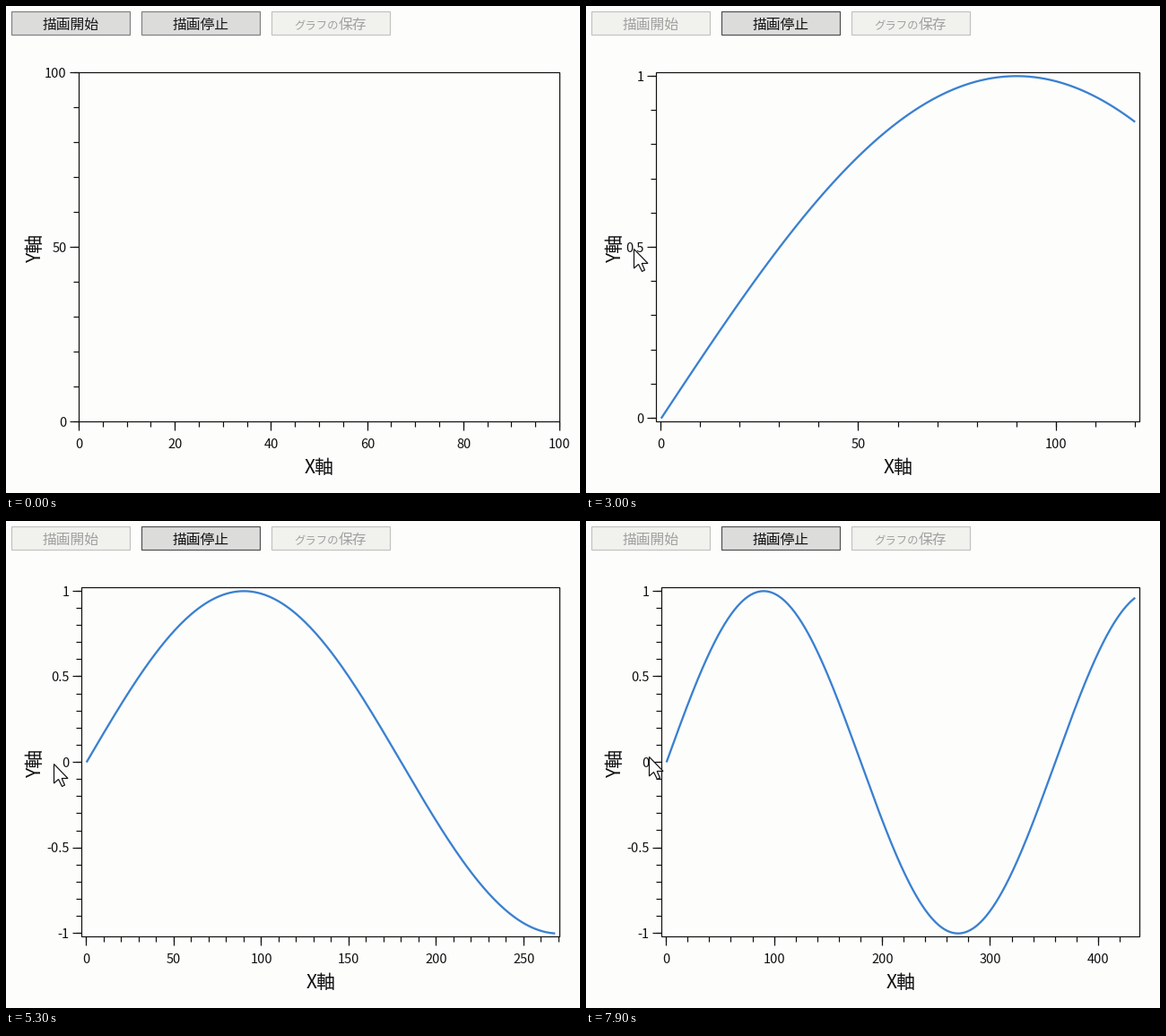
Animation of 640x544 px, one loop 8 s. Source, as a matplotlib script:

```python
import math

import numpy as np
import matplotlib.pyplot as plt
from matplotlib.animation import FuncAnimation
from matplotlib.patches import Polygon, Rectangle

W, H, DPI = 640, 544, 100
FRAMES, INTERVAL = 80, 100
START = 11                      # first step with a running plot
TOP, BOTTOM = 74.5, 464.5
FONT = "Noto Sans CJK JP"

BG = "#fdfdfc"
INK = "#101010"
CURVE = "#3a80d0"
# fill, border, text
IDLE = ("#dcdcdb", "#808080", "#181818")
FOCUS = ("#dcdcdb", "#505054", "#101010")
DISABLED = ("#f1f1ee", "#c2c2c2", "#a0a0a0")

CURSOR_T = [1, 8, 10, 11, 13, 18, 24, 30, 37, 65, 72, 79]
CURSOR_X = [618, 110, 76, 70, 45, 48, 51, 53, 53, 53, 58, 70]
CURSOR_Y = [500, 40, 18, 40, 215, 262, 286, 271, 271, 271, 270, 263]
ARROW = np.array([(0, 0), (0, 21.5), (5, 17), (9, 25), (12, 23.5),
                  (8.7, 16), (15.5, 16)])

fig = plt.figure(figsize=(W / DPI, H / DPI), dpi=DPI, facecolor=BG)
ax = fig.add_axes([0, 0, 1, 1])


def px(size):
    return size * 72 / DPI


def mid(v):
    """Centre of the pixel that holds v."""
    return math.floor(v) + 0.5


def text(x, y, s, size, color=INK, ha="center", rotation=0):
    ax.text(x, y, s, fontsize=px(size), color=color, family=FONT, ha=ha,
            va="baseline", rotation=rotation, rotation_mode="anchor")


def line(x, y, color=INK, width=1.2):
    ax.plot(x, y, color=color, lw=px(width), solid_capstyle="butt",
            snap=False)


def box(x0, y0, x1, y1, fill, edge, width=1.2):
    ax.add_patch(Rectangle((x0, y0), x1 - x0, y1 - y0, facecolor=fill,
                           edgecolor=edge, lw=px(width), joinstyle="miter",
                           snap=False))


def button(x, style, label=None):
    fill, edge, color = style
    box(x, 6.5, x + 132, 32.5, fill, edge)
    if label:
        text(x + 66, 26.3, label, 15.8, color)


def label_width(s):
    return sum({".": 4.2, "-": 6}.get(c, 7.9) for c in s)


def tick_step(span, length):
    """Smallest 1-2-5 step giving at most one interval per 90 pixels."""
    power = 10.0 ** (math.floor(math.log10(span)) - 2)
    while True:
        for m in (1, 2, 5):
            if span / (m * power) <= length / 90:
                return m * power, m * power / (4 if m == 2 else 5)
        power *= 10


def ticks(lo, hi, step):
    first, last = math.ceil(lo / step - 1e-6), math.floor(hi / step + 1e-6)
    return [round(i * step, 9) for i in range(first, last + 1)]


def padded(lo, hi):
    pad = 0.01 * (hi - lo)
    return lo - pad, hi + pad


def draw_plot(xs, ys):
    if len(xs) > 1:
        x0, x1 = padded(xs.min(), xs.max())
        y0, y1 = padded(ys.min(), ys.max())
    else:
        x0, x1, y0, y1 = 0, 100, 0, 100

    y_major, y_minor = tick_step(y1 - y0, BOTTOM - TOP)
    y_ticks = ticks(y0, y1, y_major)
    left = mid(58.2 + max(label_width(f"{v:g}") for v in y_ticks))

    x_major, x_minor = tick_step(x1 - x0, 622 - left)
    x_ticks = ticks(x0, x1, x_major)
    right = mid(629.5 - max(label_width(f"{v:g}") for v in x_ticks) / 2)

    def to_x(v):
        return left + (v - x0) / (x1 - x0) * (right - left)

    def to_y(v):
        return BOTTOM - (v - y0) / (y1 - y0) * (BOTTOM - TOP)

    line(to_x(xs), to_y(ys), CURVE, 2.3)
    box(left, TOP, right, BOTTOM, "none", INK)

    for v in ticks(x0, x1, x_minor):
        line([mid(to_x(v))] * 2, [BOTTOM, BOTTOM + 6])
    for v in x_ticks:
        line([mid(to_x(v))] * 2, [BOTTOM, BOTTOM + 10])
        text(to_x(v), 494, f"{v:g}", 14.6)
    for v in ticks(y0, y1, y_minor):
        line([left - 6, left], [mid(to_y(v))] * 2)
    for v in y_ticks:
        line([left - 10, left], [mid(to_y(v))] * 2)
        text(left - 14, to_y(v) + 5.3, f"{v:g}", 14.6, ha="right")

    text((left + right) / 2, 521.5, "X軸", 21)
    text(38.5, 269.5, "Y軸", 21, rotation=90)


def draw_cursor(k):
    tip = [np.interp(k, CURSOR_T, CURSOR_X) + 0.5,
           np.interp(k, CURSOR_T, CURSOR_Y) + 0.5]
    ax.add_patch(Polygon(ARROW + tip, facecolor=BG, edgecolor=INK,
                         lw=px(1.2), joinstyle="miter", zorder=10))


def draw(k):
    ax.clear()
    ax.set_xlim(0, W)
    ax.set_ylim(H, 0)
    ax.axis("off")

    running = k >= START
    button(6.5, DISABLED if running else IDLE, "描画開始")
    button(151.5, FOCUS if running else IDLE, "描画停止")
    button(296.5, DISABLED)
    text(371, 25.7, "グラフの", 12.4, DISABLED[2], ha="right")
    text(371, 26.3, "保存", 15.8, DISABLED[2], ha="left")

    count = round(np.interp(k, [10.7, 13, 24, 79], [0, 14, 82, 434]))
    xs = np.arange(count + 1) if running else np.array([])
    draw_plot(xs, np.sin(np.radians(xs)))
    if k > 0:
        draw_cursor(k)
    return []


anim = FuncAnimation(fig, draw, frames=FRAMES, interval=INTERVAL,
                     init_func=lambda: draw(0), repeat=True, repeat_delay=0)
plt.show()
```
